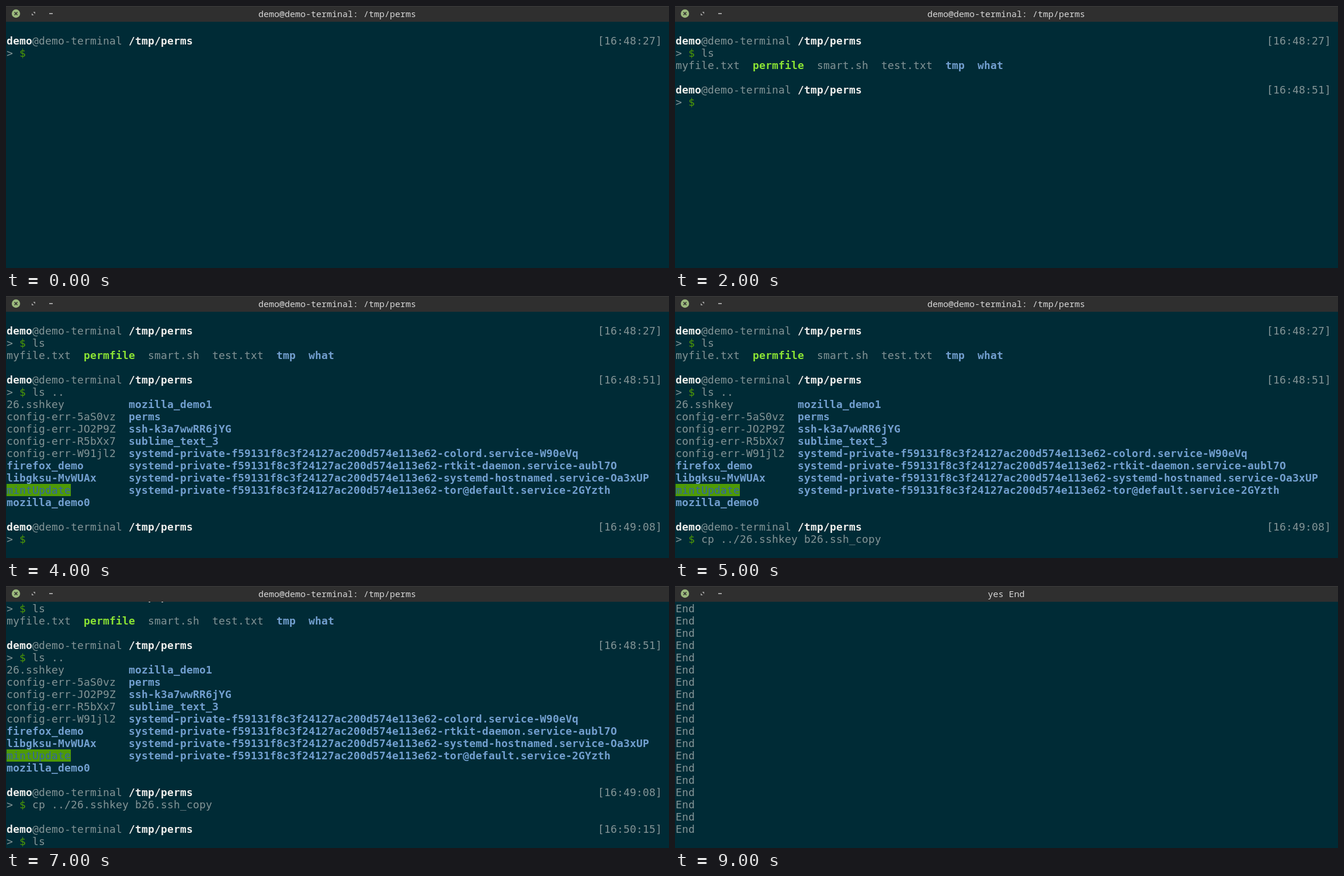
Recreate the animation shown at these times as an HTML page. Size 1135 by 449 pixels, loop 10 s.

```html
<!DOCTYPE html>
<html lang="en">
<head>
<meta charset="utf-8">
<title>Terminal session</title>
<style>
  html, body { margin: 0; width: 100%; height: 100%; overflow: hidden; background: #002b36; }
  svg { display: block; }
  #term text { font: 18px "DejaVu Sans Mono", monospace; fill: #839496; white-space: pre; }
  #term .white, #term .dir, #term .exec { font-weight: bold; }
  #term .white { fill: #eeeeec; }
  #term .dir { fill: #729fcf; }
  #term .exec { fill: #8ae234; }
  #term .dollar { fill: #4e9a06; }
  #term .open { fill: #3465a4; }
  #title { font: 500 15px "Noto Sans Mono", monospace; fill: #d8d8d8; text-anchor: middle; }
</style>
</head>
<body>
<svg width="1135" height="449" viewBox="0 0 1135 449">
  <defs><clipPath id="view"><rect y="27" width="1135" height="422"/></clipPath></defs>
  <rect width="1135" height="449" fill="#002b36"/>
  <g id="term" clip-path="url(#view)">
    <g id="session"></g>
    <g id="ending"></g>
  </g>
  <rect width="1135" height="27" fill="#2f2f2f"/>
  <rect width="1135" height="1" fill="#3b3b3b"/>
  <circle cx="17" cy="13" r="7.2" fill="#9ab87c"/>
  <path d="M14.5 10.5l5 5m0-5l-5 5" stroke="#2f2f2f" stroke-width="1.7"/>
  <path d="M46.3 10H50V13.7ZM44 12.3V16H47.7Z" fill="#a2a2a2"/>
  <rect x="74" y="12" width="6" height="2" fill="#a2a2a2"/>
  <text id="title" x="567" y="19"></text>
</svg>
<script>
const CELL = 11, ROW = 21, TOP = 28, LEFT = 1, BASE = 17;
const STEP = 1000, STEPS = 10, LAST = STEPS - 1;
const USER = "demo", HOST = "demo-terminal", DIR = "/tmp/perms";
const byId = id => document.getElementById(id);
const session = byId("session"), ending = byId("ending"), title = byId("title");
const timed = [];

function add(parent, tag, attrs, text = "") {
  const el = document.createElementNS("http://www.w3.org/2000/svg", tag);
  for (const key in attrs) el.setAttribute(key, attrs[key]);
  el.textContent = text;
  parent.appendChild(el);
  return el;
}

// Snap the monospace advance to whole-pixel terminal cells.
const probe = add(session, "text", {}, "M".repeat(100));
const spacing = CELL - probe.getComputedTextLength() / 100;
probe.remove();
byId("term").style.letterSpacing = spacing + "px";

function put(parent, row, col, text, style = "") {
  const x = LEFT + col * CELL, y = TOP + row * ROW;
  const group = add(parent, "g", {});
  if (style === "open")
    add(group, "rect", { x, y, width: text.length * CELL, height: ROW, fill: "#4e9a06" });
  add(group, "text", { x, y: y + BASE, class: style }, text);
  return group;
}

function show(from, row, col, text, style) {
  timed.push({ el: put(session, row, col, text, style), from });
}

function prompt(from, row, time, command) {
  show(from, row, 0, USER, "white");
  show(from, row, USER.length, "@" + HOST);
  show(from, row, 19, DIR, "white");
  show(from, row, 92, `[${time}]`);
  show(from, row + 1, 0, ">");
  show(from, row + 1, 2, "$", "dollar");
  if (command) show(from + 1, row + 1, 4, command);
}

const styles = { permfile: "exec", tmp: "dir", what: "dir" };
function listing(from, row, names) {
  let col = 0;
  for (const name of names) {
    show(from, row, col, name, styles[name]);
    col += name.length + 2;
  }
}

const files = ["myfile.txt", "permfile", "smart.sh", "test.txt", "tmp", "what"];
const service = name => `systemd-private-f59131f8c3f24127ac200d574e113e62-${name}`;
const left = ["26.sshkey", "config-err-5aS0vz", "config-err-JO2P9Z", "config-err-R5bXx7",
  "config-err-W91jl2", "firefox_" + USER, "libgksu-MvWUAx", "mintUpdate", `mozilla_${USER}0`];
const right = [`mozilla_${USER}1`, "perms", "ssh-k3a7wwRR6jYG", "sublime_text_3",
  service("colord.service-W90eVq"), service("rtkit-daemon.service-aubl7O"),
  service("systemd-hostnamed.service-Oa3xUP"), service("tor@default.service-2GYzth")];

prompt(0, 1, "16:48:27", "ls");
listing(2, 3, files);
prompt(2, 5, "16:48:51", "ls ..");
left.forEach((name, i) => show(4, 7 + i, 0, name, i < 5 ? "" : i === 7 ? "open" : "dir"));
right.forEach((name, i) => show(4, 7 + i, 19, name, "dir"));
prompt(4, 17, "16:49:08", "cp ../26.sshkey b26.ssh_copy");
prompt(6, 20, "16:50:15", "ls");
listing(8, 22, ["b26.ssh_copy", ...files]);
prompt(8, 24, "16:51:10");
for (let row = 0; row < 19; row++) put(ending, row, 0, "End");

const visible = (el, on) => el.setAttribute("display", on ? "inline" : "none");

function draw(ms) {
  const step = Math.floor(ms / STEP) % STEPS;
  const done = step === LAST;
  const scroll = step < 6 ? 0 : step < 8 ? 2 : 6;
  visible(session, !done);
  visible(ending, done);
  session.setAttribute("transform", `translate(0 ${-scroll * ROW})`);
  for (const { el, from } of timed) visible(el, step >= from);
  title.textContent = done ? "yes End" : `${USER}@${HOST}: ${DIR}`;
}

const start = performance.now();
function tick() {
  draw(performance.now() - start);
  requestAnimationFrame(tick);
}
tick();
</script>
</body>
</html>
```
